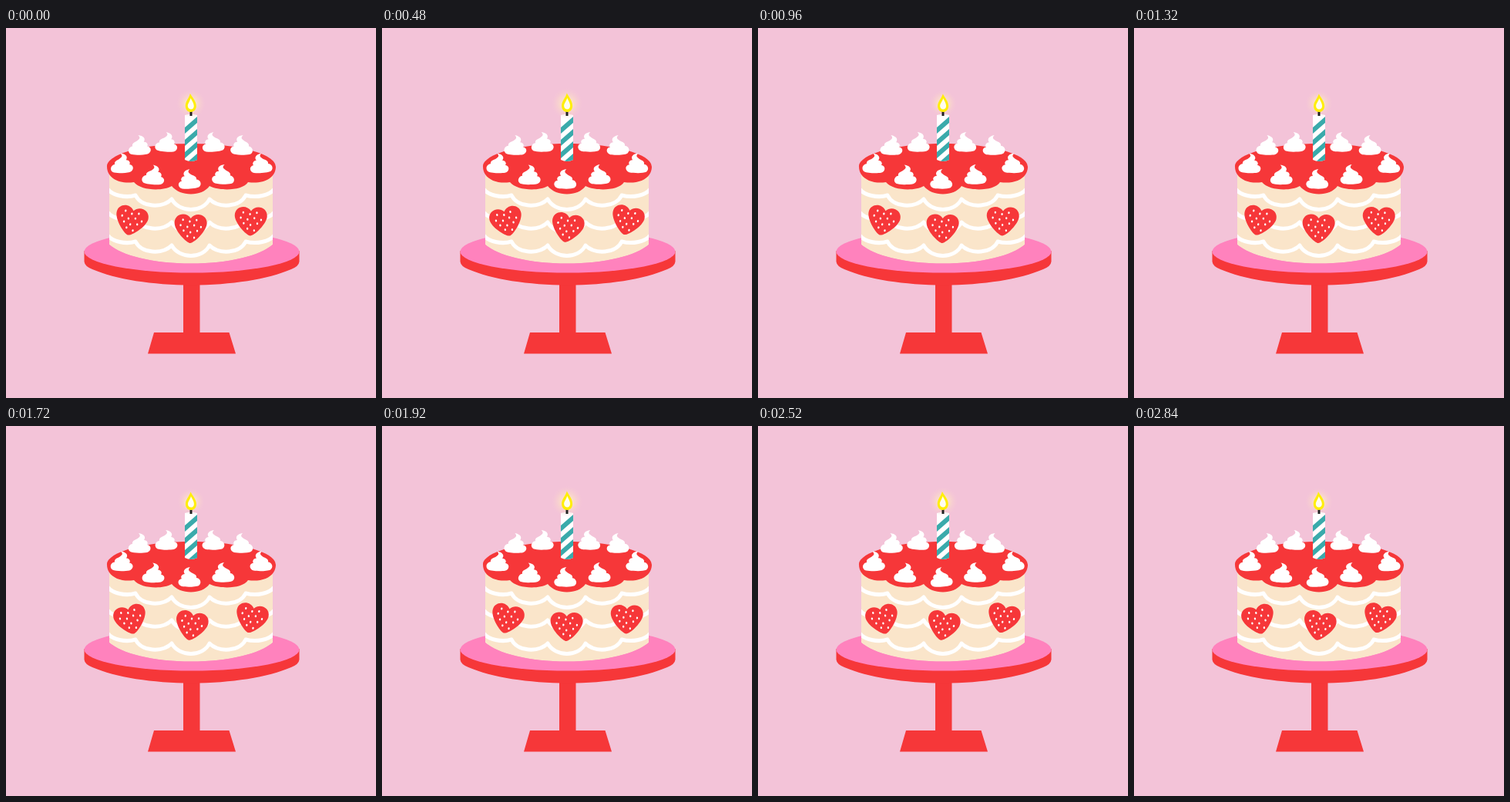
Recreate the animation shown at these times as an HTML page. Size 480 by 480 pixels, loop 2880 ms.

```html
<!DOCTYPE html>
<html lang="en">
<head>
<meta charset="utf-8">
<title>Birthday cake</title>
<style>
  html, body { margin: 0; width: 100%; height: 100%; overflow: hidden; background: #f3c3d8; }
  svg { display: block; width: 100vw; height: 100vh; }
  .red { fill: #f63739; }
  .teal { fill: #3aaaab; }
  .icing { fill: none; stroke: #fff; stroke-width: 5; stroke-linejoin: round; }
</style>
</head>
<body>
<svg viewBox="0 0 480 480">
  <defs>
    <path id="whip" fill="#fff" d="M-12-1C-17-5-13-11-9-11C-10-16-4-16-1-19C2-21 1-23-1-25C6-24 9-20 6-16C10-16 12-12 10-10C16-9 16-2 10 0C4 1-8 1-12-1Z"/>
    <path id="heart" class="red" d="M0 19C-5 19-21 3-21-7C-21-19-6-22 0-13C6-22 21-19 21-7C21 3 5 19 0 19Z"/>
    <path id="scallop" class="icing" d="M132 209C138 217 155 221 168 217C176 233 203 234 215 222C225 240 255 240 264 222C276 234 303 233 311 217C325 221 342 217 348 209"/>
    <clipPath id="body"><path id="bodyShape" d="M134 180V281C150 295 190 305.500 240 305.500S330 295 346 281V180Z"/></clipPath>
    <clipPath id="candle"><path d="M232 113Q240 110 248 113V171Q240 175 232 171Z"/></clipPath>
    <radialGradient id="glow">
      <stop offset=".35" stop-color="#fff0c0" stop-opacity=".6"/>
      <stop offset=".7" stop-color="#fad6cc" stop-opacity=".4"/>
      <stop offset="1" stop-color="#f7cbd4" stop-opacity="0"/>
    </radialGradient>
  </defs>

  <rect width="480" height="480" fill="#f3c3d8"/>
  <path class="red" d="M230 325H251.500V395H289.500L298 422.500H184L192 395H230Z"/>
  <path class="red" d="M101.500 289V303Q102 309 112 313C142 326 190 333.500 241 333.500S340 326 370 313Q380 309 380.500 303V289Z"/>
  <ellipse cx="241" cy="290" rx="139.500" ry="27.500" fill="#ff82bd"/>

  <g clip-path="url(#body)">
    <use href="#bodyShape" fill="#fae5ca"/>
    <use href="#scallop"/>
    <use href="#scallop" y="30"/>
    <use href="#scallop" y="60"/>
  </g>
  <path class="red" d="M131 180C131 163 180 150 240 150S350 163 350 180C350 195 333 203 314 200C307 211 278 212 264 205C254 219 226 219 215 205C203 212 175 211 166 200C148 203 131 195 131 180Z"/>

  <g id="hearts"></g>
  <g id="backWhips"></g>
  <g clip-path="url(#candle)" id="stick"><rect x="230" y="108" width="20" height="70" fill="#fff"/></g>
  <circle id="halo" cx="240" cy="98" r="19" fill="url(#glow)"/>
  <path d="M240 106V114" stroke="#222" stroke-width="3"/>
  <g id="flame">
    <path fill="#ffee08" d="M239.500 85C242 90 247 95 247 101C247 106 244 109 240 109S233 106 233 101C233 95 238 91 239.500 85Z"/>
    <path fill="#fffdf0" d="M240 91C242 95 244 98 244 101S242 105.500 240 105.500S236 104 236 101S239 95 240 91Z"/>
  </g>
  <g id="frontWhips"></g>
</svg>
<script>
const LOOP = 2880, STEP = 40, BEAT = 480, SWAY = 360;
const $ = id => document.getElementById(id);

function add(parent, tag, attrs) {
  const el = document.createElementNS('http://www.w3.org/2000/svg', tag);
  for (const key in attrs) el.setAttribute(key, attrs[key]);
  return parent.appendChild(el);
}

for (let y = 129; y < 200; y += 16)
  add($('stick'), 'path', { class: 'teal', d: `M232 ${y}l16-14v8l-16 14Z` });

// Each heart has two poses: x, y, angle
const hearts = [
  [[162.5, 250, 13], [161.5, 251, -13]],
  [[239.5, 260, 1], [240.5, 259, 11]],
  [[317.5, 250.5, 2], [318.5, 249.5, 13]]
].map(poses => {
  const el = add($('hearts'), 'g', {});
  add(el, 'use', { href: '#heart' });
  [[-10, -11, 3], [-13, -4, 4], [-9, 3, 3], [-4, 10, 2]].forEach(([x, y, count]) => {
    for (let i = 0; i < count; i++)
      add(el, 'ellipse', { cx: x + i * 8.8, cy: y + (i % 2) * 2, rx: 1.2, ry: 1.5, fill: '#fff' });
  });
  return { el, poses };
});

const makeWhips = (id, spots) => spots.map(([x, y]) => ({
  x, y, flip: x > 215 ? -1 : 1, el: add($(id), 'use', { href: '#whip' })
}));
const whips = [
  ...makeWhips('backWhips', [[173, 164], [208, 160], [269, 160], [306, 164]]),
  ...makeWhips('frontWhips', [[150, 187.5], [191, 202.5], [238, 208], [282, 202], [331, 187.5]])
];

function draw(now) {
  const t = Math.floor(now % LOOP / STEP) * STEP;
  const pose = Math.floor(t / BEAT) % 2;
  for (const { el, poses } of hearts) {
    const [x, y, angle] = poses[pose];
    el.setAttribute('transform', `translate(${x} ${y}) rotate(${angle})`);
  }
  const sway = Math.cos(t / SWAY * 2 * Math.PI);
  whips.forEach(({ el, x, y, flip }, i) => {
    const angle = sway * (i % 2 ? 3 : -3);
    el.setAttribute('transform',
      `translate(${x} ${y}) rotate(${angle} 0 -12) scale(${flip} 1)`);
  });
  const flicker = Math.sin(t / SWAY * 2 * Math.PI);
  $('flame').setAttribute('transform',
    `translate(240 109) rotate(${-sway * 1.5}) scale(1 ${1 + flicker * .02}) translate(-240 -109)`);
  $('halo').setAttribute('r', 19 + flicker * 1.5);
}

const start = performance.now();
function tick() {
  draw(performance.now() - start);
  requestAnimationFrame(tick);
}
tick();
</script>
</body>
</html>
```
